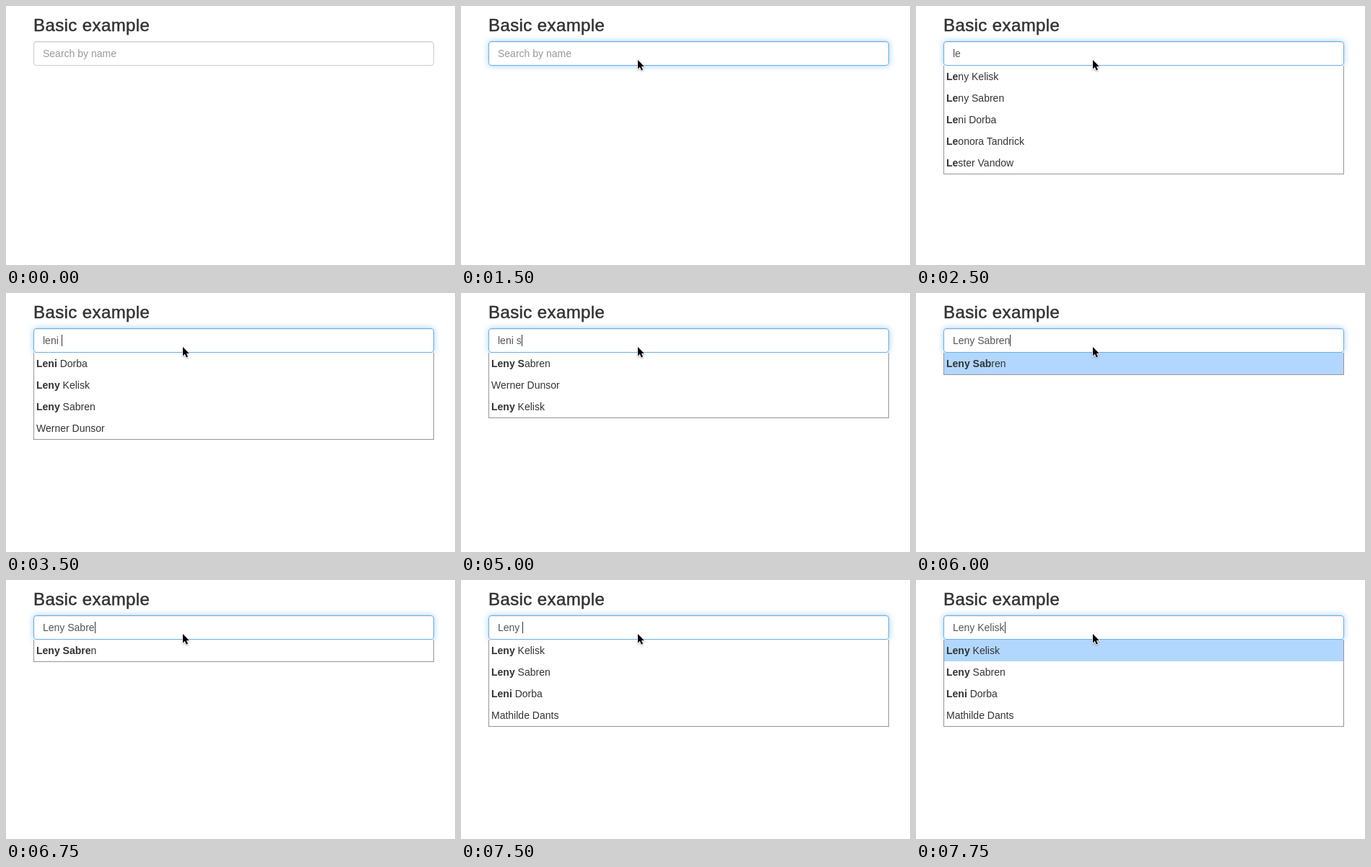
Animation of 622x360 px, one loop 8000 ms. Source, as an HTML page:

```html
<!DOCTYPE html>
<html lang="en">
<head>
<meta charset="utf-8">
<title>Basic example</title>
<style>
  html, body { margin: 0; width: 100%; height: 100%; overflow: hidden; background: #fff; }
  body { position: relative; font: 14px/30px "Liberation Sans", Arial, sans-serif; color: #333; }
  h3 {
    position: absolute; left: 38px; top: 12px; margin: 0;
    font-size: 24px; font-weight: 400; line-height: 30px; letter-spacing: .4px;
    -webkit-text-stroke: .5px #333; white-space: pre;
  }
  #field {
    position: absolute; left: 38px; top: 49px; width: 555px; height: 34px;
    box-sizing: border-box; padding: 0 12px; line-height: 32px; white-space: pre;
    border: 1px solid #ccc; border-radius: 4px; color: #555;
    box-shadow: inset 0 1px 1px rgba(0, 0, 0, .075);
  }
  #field.focus {
    border-color: #66afe9;
    box-shadow: inset 0 1px 1px rgba(0, 0, 0, .075), 0 0 8px rgba(102, 175, 233, .6);
  }
  #hint { color: #999; }
  #caret {
    display: inline-block; width: 1px; height: 16px; margin-right: -1px;
    vertical-align: -3px; background: #333;
  }
  #list {
    position: absolute; left: 38px; top: 83px; width: 555px; box-sizing: border-box;
    border: solid #969696; border-width: 0 1px 1px; background: #fff;
  }
  #list div { height: 30px; padding-left: 3px; white-space: pre; }
  #list .hot { background: #b2d7ff; }
  #pointer { position: absolute; left: 0; top: 0; overflow: visible; filter: drop-shadow(0 1px 1px rgba(0, 0, 0, .3)); }
</style>
</head>
<body>
<h3>Basic example</h3>
<div id="field"><span id="query"></span><span id="caret"></span><span id="hint">Search by name</span></div>
<div id="list"></div>
<svg id="pointer" width="13" height="18">
  <path d="M1 1V13.4L3.8 10.8L5.8 15.4L8 14.5L6 10H9.8Z" stroke="#fff" stroke-width="1.6" paint-order="stroke"/>
</svg>
<script>
const LOOP = 8000;
const $ = id => document.getElementById(id);

const DORBA = "Leni Dorba", KELISK = "Leny Kelisk", SABREN = "Leny Sabren";
const DUNSOR = "Werner Dunsor", DANTS = "Mathilde Dants", TANDRICK = "Leonora Tandrick";

// Each name is paired with the number of leading letters in bold.
const rows = (names, bold) => names.map((name, i) => [name, bold[i] || 0]);

// Each step changes only the values it names.
const steps = [
  { at: 0, text: "", caret: false, focus: false, list: [], hot: false, pointer: null },
  { at: 250, pointer: [318, 12] },
  { at: 500, pointer: [264, 50] },
  { at: 750, pointer: [244, 74] },
  { at: 1000, focus: true, caret: true },
  { at: 1500, caret: false },
  { at: 1750, text: "l", caret: true,
    list: rows([DORBA, KELISK, TANDRICK, SABREN, "Lucas Penby"], [1, 1, 1, 1, 1]) },
  { at: 2000, text: "le",
    list: rows([KELISK, SABREN, DORBA, TANDRICK, "Lester Vandow"], [2, 2, 2, 2, 2]) },
  { at: 2500, caret: false },
  { at: 3000, caret: true },
  { at: 3250, text: "leni", list: rows([DORBA, KELISK, SABREN, DUNSOR, DANTS], [4, 4, 4]) },
  { at: 3500, text: "leni ", list: rows([DORBA, KELISK, SABREN, DUNSOR], [4, 4, 4]) },
  { at: 4000, caret: false },
  { at: 4500, caret: true },
  { at: 5000, text: "leni s", list: rows([SABREN, DUNSOR, KELISK], [6, 0, 4]) },
  { at: 5250, text: "leni sab", list: rows([SABREN], [8]) },
  { at: 5750, caret: false },
  { at: 6000, text: SABREN, caret: true, hot: true },
  { at: 6500, caret: false },
  { at: 6750, text: SABREN.slice(0, -1), caret: true, hot: false, list: rows([SABREN], [10]) },
  { at: 7000, text: "Leny S", list: rows([SABREN, KELISK, DORBA, DUNSOR], [6, 4, 4]) },
  { at: 7500, text: "Leny ", list: rows([KELISK, SABREN, DORBA, DANTS], [4, 4, 4]) },
  { at: 7750, text: KELISK, hot: true }
];

const states = [];
steps.forEach((step, i) => states.push({ ...states[i - 1], ...step }));

function row([name, bold], hot) {
  const div = document.createElement("div");
  const b = document.createElement("b");
  b.textContent = name.slice(0, bold);
  div.append(b, name.slice(bold));
  if (hot) div.className = "hot";
  return div;
}

function show(s) {
  $("query").textContent = s.text;
  $("hint").hidden = s.text !== "";
  $("caret").style.visibility = s.caret ? "visible" : "hidden";
  $("field").className = s.focus ? "focus" : "";
  $("list").hidden = !s.list.length;
  $("list").replaceChildren(...s.list.map((item, i) => row(item, s.hot && i === 0)));
  $("pointer").style.display = s.pointer ? "block" : "none";
  if (s.pointer) $("pointer").style.transform = `translate(${s.pointer[0]}px, ${s.pointer[1]}px)`;
}

let current = null;
const start = performance.now();

function tick() {
  const t = (performance.now() - start) % LOOP;
  const next = states.findLast(s => s.at <= t);
  if (next !== current) show(current = next);
  requestAnimationFrame(tick);
}
tick();
</script>
</body>
</html>
```
